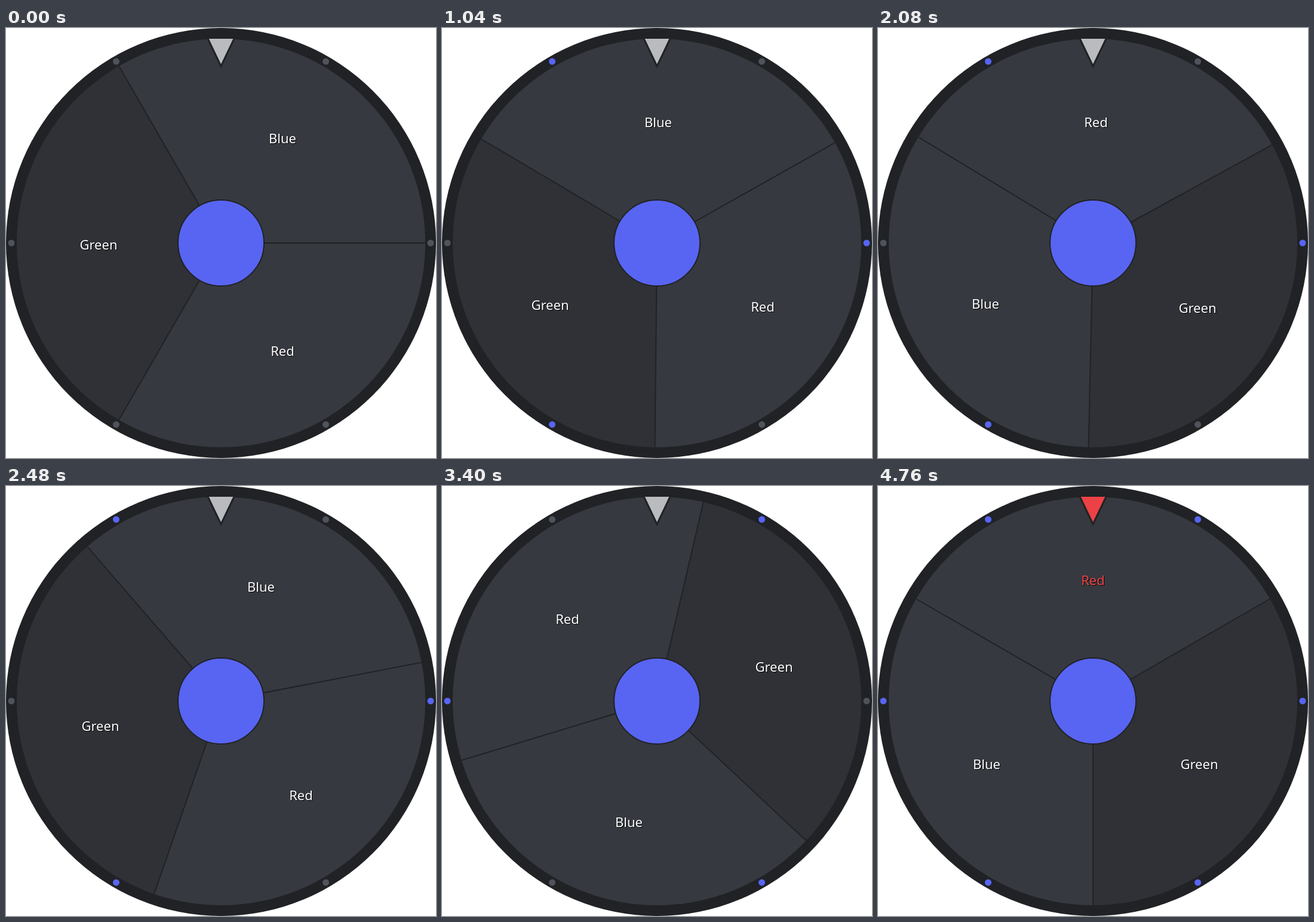
Write an HTML page that moves like this. It is 720 px wide and 720 px high and loops after 4800 ms.

```html
<!DOCTYPE html>
<html lang="en">
<head>
<meta charset="utf-8">
<title>Wheel</title>
<style>
  html, body { margin: 0; width: 100%; height: 100%; overflow: hidden; background: #fff; }
  svg { display: block; width: 100vw; height: 100vh; }
  text { font: 22px "Noto Sans", "Open Sans", sans-serif; text-anchor: middle; }
</style>
</head>
<body>
<svg id="stage" viewBox="0 0 720 720"></svg>
<script>
const C = 360, R = 342, LABEL_R = 205.2, DOT_R = 351;
const DARK = '#202225', GREY = '#4f545c', BLUE = '#5865f2', RED = '#ed4245';
const STEP = 40, STEPS = 120, LAST = STEPS - 1, TURN = 2010;
const WIN_FROM = 108, FLASH = 4;

const stage = document.getElementById('stage');

function add(tag, attrs, parent = stage) {
  const el = document.createElementNS('http://www.w3.org/2000/svg', tag);
  for (const key in attrs) el.setAttribute(key, attrs[key]);
  return parent.appendChild(el);
}

function polar(deg, r) {
  const a = deg * Math.PI / 180;
  return [C + r * Math.cos(a), C + r * Math.sin(a)];
}

const slices = [
  { name: 'Red', fill: '#36393f' },
  { name: 'Green', fill: '#2f3136' },
  { name: 'Blue', fill: '#36393f' }
];

add('circle', { cx: C, cy: C, r: 360, fill: DARK });

const wheel = add('g', {});
slices.forEach((s, i) => {
  add('path', {
    d: `M${C} ${C}L${polar(i * 120, R)}A${R} ${R} 0 0 1 ${polar(i * 120 + 120, R)}Z`,
    fill: s.fill
  }, wheel);
});
slices.forEach((s, i) => {
  add('path', { d: `M${C} ${C}L${polar(i * 120, R)}`, stroke: DARK, 'stroke-width': 2 }, wheel);
});

for (const s of slices) {
  s.shadow = add('text', { fill: '#000' });
  s.label = add('text', { fill: '#fff' });
  s.shadow.textContent = s.label.textContent = s.name;
}

add('circle', { cx: C, cy: C, r: 72, fill: BLUE, stroke: DARK, 'stroke-width': 2 });

const pointer = add('path', { d: 'M338 18H382L360 64Z' });
add('path', {
  d: 'M335.13 12L360 64L384.87 12', fill: 'none',
  stroke: DARK, 'stroke-width': 3, 'stroke-miterlimit': 10
});

const dots = [0, 1, 2, 3, 4, 5].map(i => {
  const [cx, cy] = polar(i * 60, DOT_R);
  return add('circle', { cx, cy, r: 5.5 });
});

function place(el, x, y) {
  el.setAttribute('x', x);
  el.setAttribute('y', y);
}

function draw(ms) {
  const n = Math.floor(ms / STEP) % STEPS;
  const angle = TURN * (1 - Math.pow(1 - n / LAST, 3));
  const done = n >= WIN_FROM;
  const flash = done && Math.floor(n / FLASH) % 2 === 1;

  wheel.setAttribute('transform', `rotate(${angle} ${C} ${C})`);
  slices.forEach((s, i) => {
    const [px, py] = polar(angle + i * 120 + 60, LABEL_R);
    const x = Math.round(px), y = Math.round(py) + 11;
    place(s.label, x, y);
    place(s.shadow, x + 1, y + 1);
    s.label.setAttribute('fill', flash && i === 0 ? RED : '#fff');
  });

  pointer.setAttribute('fill', flash ? RED : '#b9bbbe');
  // Lamps swap with every sixth of a turn, then flash together.
  const beat = Math.floor(angle / 60);
  dots.forEach((dot, i) => {
    const lit = done ? flash : n > 0 && (i + beat) % 2 === 1;
    dot.setAttribute('fill', lit ? BLUE : GREY);
  });
}

const start = performance.now();
function tick() {
  draw(performance.now() - start);
  requestAnimationFrame(tick);
}
draw(0);
requestAnimationFrame(tick);
</script>
</body>
</html>
```
